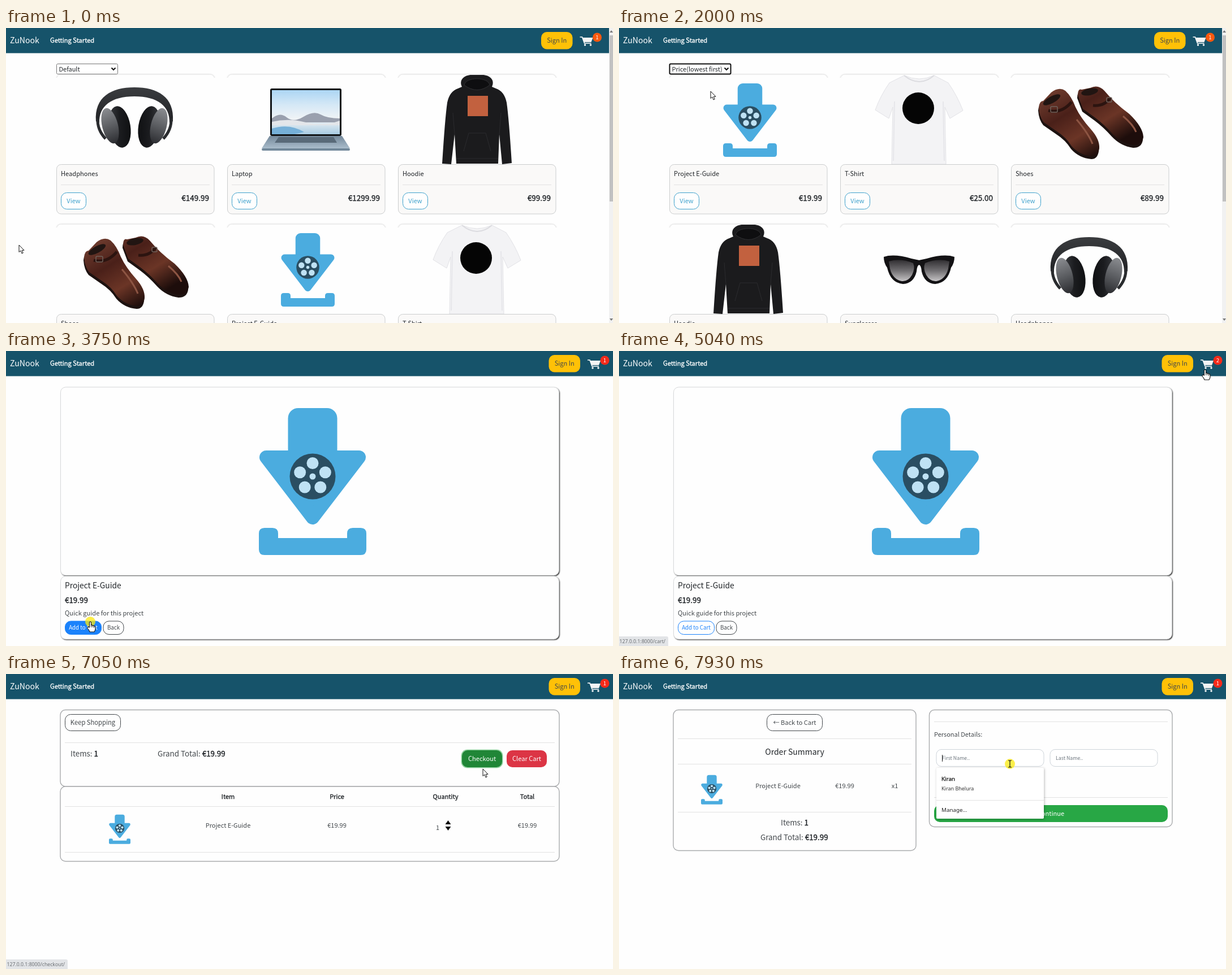
Animation of 1073x522 px, one loop 8000 ms. Source, as an HTML page with a canvas:

```html
<!DOCTYPE html>
<html lang="en">
<head>
<meta charset="utf-8">
<title>Shop walkthrough</title>
<style>
html, body { margin: 0; width: 100%; height: 100%; overflow: hidden; background: #fefefe; }
canvas { display: block; }
</style>
</head>
<body>
<canvas id="stage" width="1073" height="522"></canvas>
<script>
const ctx = document.getElementById('stage').getContext('2d', { alpha: false });
const LOOP = 8000;
const SANS = '"Noto Sans CJK JP", "Noto Sans CJK SC", "Noto Sans CJK", "Noto Sans", sans-serif';
const UI = '"Noto Sans", "Open Sans", sans-serif';
const INK = '#212529', SOFT = '#42474b', BLUE = '#4bacdf', GREEN = '#28a745';

// Pointer path: time, x, y of the tip
const PATH = [
  [0, 23, 384], [120, 23, 384], [860, 188, 71], [990, 188, 71], [1330, 167, 116],
  [1660, 167, 116], [1860, 162, 112], [2000, 162, 112], [2700, 127, 306], [2980, 127, 306],
  [3610, 149, 479], [3960, 149, 479], [4900, 1036, 33], [5110, 1036, 33], [5250, 777, 215],
  [5950, 782, 272], [6400, 782, 272], [6900, 843, 155], [6980, 843, 155], [7050, 843, 168],
  [7250, 843, 168], [7720, 691, 159], [LOOP, 691, 159]
];
const CLICKS = [[790, 990], [1860, 2000], [2840, 2980], [3680, 3890], [6160, 6300], [6940, 7040], [7790, LOOP]];

let time = 0, mouse = { x: 0, y: 0 }, hand = false;

// ---- drawing helpers ----
function text(s, x, y, size = 11, color = INK, align = 'left', font = SANS) {
  ctx.font = `${size}px ${font}`;
  ctx.fillStyle = color;
  ctx.textAlign = align;
  ctx.fillText(s, x, y + size * .365);
  return ctx.measureText(s).width;
}

// Medium weight: regular letters with a hairline outline
function strong(s, x, y, size = 11, color = INK, align = 'left', font = SANS) {
  text(s, x, y, size, color, align, font);
  ctx.strokeStyle = color;
  ctx.lineWidth = .35;
  ctx.strokeText(s, x, y + size * .365);
}

function paint(path, fill, stroke, width = 1) {
  if (fill) { ctx.fillStyle = fill; ctx.fill(path); }
  if (stroke) { ctx.strokeStyle = stroke; ctx.lineWidth = width; ctx.stroke(path); }
}

const shape = (d, fill, stroke, width) => paint(new Path2D(d), fill, stroke, width);

function box(x, y, w, h, r, fill, stroke, width) {
  const p = new Path2D();
  p.roundRect(x, y, w, h, r);
  paint(p, fill, stroke, width);
}

function oval(x, y, rx, ry, fill, turn = 0) {
  const p = new Path2D();
  p.ellipse(x, y, rx, ry, turn, 0, 7);
  paint(p, fill);
}

const dot = (x, y, r, fill) => oval(x, y, r, r, fill);
const rule = (x1, x2, y) => box(x1, y, x2 - x1, 1, 0, '#e2e2e2');

function shade(x1, y1, x2, y2, ...colors) {
  const g = ctx.createLinearGradient(x1, y1, x2, y2);
  colors.forEach((c, i) => g.addColorStop(i / (colors.length - 1), c));
  return g;
}

function shadowed(blur, offset, color, draw) {
  ctx.save();
  ctx.shadowBlur = blur;
  ctx.shadowOffsetX = ctx.shadowOffsetY = offset;
  ctx.shadowColor = color;
  draw();
  ctx.restore();
}

function at(x, y, draw, sx = 1, sy = sx) {
  ctx.save();
  ctx.translate(x, y);
  ctx.scale(sx, sy);
  draw();
  ctx.restore();
}

function mirrored(axis, draw) {
  draw();
  at(2 * axis, 0, draw, -1, 1);
}

function hover(x, y, w, h) {
  const over = mouse.x >= x && mouse.x <= x + w && mouse.y >= y && mouse.y <= y + h;
  hand = hand || over;
  return over;
}

function outlineButton(s, x, y, w, h, color, size = 11, r = 10) {
  const over = hover(x, y, w, h);
  box(x + .5, y + .5, w - 1, h - 1, r, over ? color : '#fefefe', color);
  text(s, x + w / 2, y + h / 2, size, over ? '#fff' : color, 'center');
}

function solidButton(s, x, y, w, h, fill, color = '#fff') {
  box(x, y, w, h, 10, fill);
  text(s, x + w / 2, y + h / 2, 11.1, color, 'center');
}

function pair(label, value, x, y) {
  const w = text(label, x, y, 13.4, SOFT);
  strong(value, x + w + 3, y, 13.4);
}

// ---- product pictures ----
function guide() {
  box(-43.5, -121, 87, 100, [18, 18, 0, 0], BLUE);
  ctx.lineJoin = 'round';
  shape('M-82-34H82L0 73Z', BLUE, BLUE, 24);
  shape('M-85 91H-71Q-61 91-61 101V109H61V101Q61 91 71 91H85Q95 91 95 101V129Q95 139 85 139H-85Q-95 139-95 129V101Q-95 91-85 91Z', BLUE);
  dot(0, 0, 40.5, '#2a4e62');
  dot(0, 0, 5.5, '#bfe2f4');
  for (let i = 0; i < 5; i++) {
    const a = i * Math.PI * .4;
    dot(23.5 * Math.sin(a), -23.5 * Math.cos(a), 10.5, '#bfe2f4');
  }
}

function headphones() {
  shape('M159 165C156 122 186 105 227 105S298 122 295 165L289 168C290 138 268 121 227 121S164 138 165 168Z', shade(0, 105, 0, 165, '#3a3c3f', '#222326'));
  mirrored(227, () => {
    shape('M162 160Q161 180 176 196', null, '#2a2c2f', 5);
    oval(201, 175, 19, 37, shade(182, 0, 220, 0, '#37393d', '#1b1c1f', '#101113'), -.16);
    oval(184, 173, 14, 32, shade(170, 145, 194, 205, '#8a8c90', '#5b5d61', '#2a2b2f'), -.24);
  });
}

function laptop() {
  box(467, 107, 126, 84, 3, '#111417');
  box(470, 110, 120, 78, 0, shade(0, 110, 0, 188, '#acd6f4', '#d5e8f6', '#f1f4f6', '#a8cbe2'));
  shape('M470 160Q484 148 496 158T526 157T556 153T590 160V167H470Z', '#9aa0ae');
  shape('M470 166Q500 159 530 167T590 164V172H470Z', '#e3e6ea');
  shape('M470 178Q500 168 527 184L510 188H470Z', '#76b0d8');
  shape('M466 191H594L608 213H452Z', shade(0, 191, 0, 213, '#74889a', '#a9bccb'));
  shape('M482 193H579L585 203H475Z', '#596a79');
  box(452, 213, 156, 4, 2, '#72889a');
}

function hoodie() {
  shape('M806 104C800 92 810 83 823 83H842C855 83 865 92 859 104L866 107Q881 112 885 132Q889 160 894 239L877 241L872 188L870 240H796L793 188L787 241L771 240Q776 160 780 132Q784 112 799 107Z', '#1b1b1d');
  shape('M810 101C812 86 853 86 855 101Q833 118 810 101Z', '#0e0e10', '#303033');
  shape('M818 186H848L857 218M818 186L809 218M796 231H870M793 188L790 150M872 188L875 150', null, '#2b2b2e');
  box(816, 120, 36, 36, 0, '#c2613f');
}

function shoes() {
  const left = 'M138 406Q139 394 146 394L160 379Q174 368 185 376Q196 386 203 405Q212 424 230 444Q246 462 245 478Q243 492 232 492Q210 490 196 474Q186 458 170 448L147 432Q139 422 138 406Z';
  const right = 'M207 384Q207 371 214 374L229 371Q243 364 254 376Q272 398 298 417Q322 440 323 458Q321 472 306 472Q284 469 268 452Q254 436 238 424L216 408Z';
  for (const d of [right, left]) {
    at(-1, 5, () => shape(d, '#1d1210'));
    shape(d, shade(170, 375, 240, 490, '#6b392c', '#4a2019', '#6b3526', '#1d0d0b'));
  }
  oval(161, 392, 17, 6, '#211512', -.5);
  oval(228, 378, 15, 6, '#211512', -.2);
  shape('M155 411Q178 417 196 396M234 402Q254 404 265 388', null, '#2c1410', 5);
  box(159, 404, 12, 10, 2, null, '#6f625b', 1.5);
  box(258, 388, 9, 8, 2, null, '#6f625b', 1.5);
  shape('M205 427Q226 452 233 470M287 421Q305 436 310 449', null, '#8d5543', 3);
}

function shirt() {
  shape('M806 349Q833 361 859 349L884 362Q900 385 910 411L887 425L878 405L880 506H784L786 405L779 425L755 410Q764 385 780 362Z', '#f3f3f5', '#e2e2e6');
  shape('M806 349Q833 371 859 349', null, '#dcdce0', 2);
  shape('M789 395L787 500M875 395L877 500', null, '#e6e6ea', 2);
  dot(831, 407, 28, '#050505');
}

function sunglasses() {
  mirrored(530.5, () => {
    shape('M468 405Q486 399 517 408L531 411V419Q527 419 526 431Q521 452 502 453Q480 451 474 424Q468 416 468 405Z', '#131214');
    shape('M477 413Q497 407 520 416Q524 425 518 437Q511 449 500 448Q484 445 479 426Z', shade(0, 409, 0, 449, '#2c2a2d', '#6f6d70', '#cac8ca'));
  });
}

const product = (name, price, x, y, draw) => ({ name, price, x, y, draw });
const P = {
  headphones: product('Headphones', '€149.99', 89, 82, headphones),
  laptop: product('Laptop', '€1299.99', 391, 82, laptop),
  hoodie: product('Hoodie', '€99.99', 693, 82, hoodie),
  shoes: product('Shoes', '€89.99', 89, 347, shoes),
  guide: product('Project E-Guide', '€19.99', 0, 0, () => at(142.5, 76.5, guide, .5)),
  shirt: product('T-Shirt', '€25.00', 693, 347, shirt),
  sunglasses: product('Sunglasses', '', 391, 347, sunglasses)
};
const BY_DEFAULT = [P.headphones, P.laptop, P.hoodie, P.shoes, P.guide, P.shirt];
const BY_PRICE = [P.guide, P.shirt, P.shoes, P.hoodie, P.sunglasses, P.headphones];

// ---- page parts ----
function header(width, inset, count, badge) {
  box(0, 0, width, 44.6, 0, '#16536a');
  text('ZuNook', 7, 22, 14.1, '#fff');
  strong('Getting Started', 78, 22, 11.1, '#fff');
  at(-inset, 0, () => {
    solidButton('Sign In', 959.5, 7, 55.5, 30.5, '#ffc107', SOFT);
    shape('M1028 16H1032L1036 27H1048', null, '#fff', 1.6);
    shape('M1033 17H1051L1048 25H1035Z', '#f4f4f4');
    dot(1037, 30, 1.7, '#fff');
    dot(1047, 30, 1.7, '#fff');
    dot(1058.5, 16.5, 8, badge);
    text(count, 1058.5, 16.5, 9.5, '#fff', 'center');
  });
}

function panel(x, y, w, h, lifted) {
  const fill = () => box(x, y, w, h, 9, '#fefefe');
  lifted ? shadowed(2, 1.3, '#222', fill) : fill();
  box(x, y, w, h, 9, null, lifted ? '#d0d2d4' : '#a9abad', lifted ? .8 : 1.4);
}

function card(item, x, y) {
  shadowed(3, 0, '#bbb', () => box(x + .5, y + .5, 279, 159, 8, '#fefefe'));
  box(x - 3, y + 6, 286, 156, 0, '#fefefe');
  at(x - item.x, y - item.y, item.draw);
  box(x + .5, y + 159.5, 278.5, 87.5, 8, '#faf9f8', '#cbcdce');
  text(item.name, x + 8, y + 175.5, 11.1);
  rule(x + 8, x + 271, y + 195);
  outlineButton('View', x + 8, y + 209, 45, 30, '#3ca0cc');
  strong(item.price, x + 270, y + 219, 13.5, INK, 'right');
}

function select() {
  const sorted = time >= 2000;
  box(89.5, 63.5, 108, 18, 2, '#fff', sorted ? '#101010' : '#767676', sorted ? 2 : 1);
  text(sorted ? 'Price(lowest first)' : 'Default', 93.5, 73);
  shape('M186.500 70.500L190 74L193.500 70.500', null, '#111', 2);
  if (time < 990 || sorted) return;
  shadowed(5, 2, '#0006', () => box(89.5, 82.5, 108, 49.500, 0, '#fff', '#888'));
  const picked = Math.max(0, Math.min(2, Math.floor((mouse.y - 82) / 16.3)));
  ['Default', 'Price(lowest first)', 'Products(A-Z)'].forEach((s, i) => {
    if (i === picked) box(90, 82.500 + i * 16, 107, 17, 0, '#1e90ff');
    text(s, 94, 90.5 + i * 16, 11, i === picked ? '#fff' : INK);
  });
}

function status(s, w) {
  box(-1, 505, w + 1, 18, [0, 3, 0, 0], '#e2e4e7');
  text(s, w - 5, 513.5, 8.7, '#6b6f73', 'right', UI);
}

// ---- pages ----
function listPage() {
  header(1066, 13.5, '1', '#f9590f');
  (time < 2000 ? BY_DEFAULT : BY_PRICE).forEach((item, i) =>
    card(item, 89 + i % 3 * 302, 82 + Math.floor(i / 3) * 265));
  select();
  box(1066, 0, 7, 522, 0, '#f1f1f1');
  box(1067, 13, 6, 294, 0, '#c1c1c1');
  shape('M1067 8L1070 4L1073 8Z', '#777');
  shape('M1067 514L1070 518L1073 514Z', '#777');
}

function detailPage() {
  header(1073, 0, time < 3960 ? '1' : '2', '#f42a1a');
  panel(96.5, 64, 881, 333, true);
  panel(96.5, 398.5, 881, 111.500, true);
  at(542, 222, guide);
  text('Project E-Guide', 104, 415, 13.8);
  strong('€19.99', 104, 441, 13.4);
  text('Quick guide for this project', 104, 464, 11.1, SOFT);
  outlineButton('Add to Cart', 104, 477.500, 65, 24.500, '#1b82fb', 9.7);
  outlineButton('Back', 171.500, 477.500, 37, 24.500, SOFT, 9.7);
  if (hover(1026, 12, 28, 25)) status('127.0.0.1:8000/cart/', 87);
}

function cartPage() {
  const count = time < 6300 ? '2' : '1';
  const total = time < 6300 ? '€39.98' : '€19.99';
  const focused = time >= 6980;
  header(1073, 0, count, '#f42a1a');
  panel(96, 63.5, 882, 135.5);
  panel(96, 199, 882, 132.500);
  outlineButton('Keep Shopping', 104, 71, 99, 30, SOFT, 11.2);
  rule(104, 970, 121);
  pair('Items:', count, 114, 141);
  pair('Grand Total:', total, 268, 141);
  if (focused) box(804.500, 133.500, 74, 33, 11, '#94d3a2');
  const over = hover(806, 135, 71, 30);
  solidButton('Checkout', 806, 135, 71, 30, over || focused ? '#208637' : GREEN);
  solidButton('Clear Cart', 885, 135, 71, 30, '#dc3545');
  const columns = [['Item', 'Project E-Guide', 392.5], ['Price', '€19.99', 585], ['Quantity', '', 777], ['Total', total, 921.5]];
  for (const [title, value, x] of columns) {
    strong(title, x, 217, 11, INK, 'center');
    text(value, x, 268, 11, SOFT, 'center');
  }
  rule(104, 970, 234);
  rule(104, 970, 315);
  at(201, 273, guide, .2);
  text(count, 763, 272, 11, SOFT, 'center');
  shape('M776.500 266L781.500 259L786.500 266ZM776.500 270L781.500 277L786.500 270Z', '#111');
  hover(776, 258, 11, 20);
  if (time < 5320) status('127.0.0.1:8000/cart/', 87);
  if (focused) status('127.0.0.1:8000/checkout/', 109);
}

function checkoutPage() {
  header(1073, 0, '1', '#f42a1a');
  panel(96, 63.5, 429, 249);
  outlineButton('← Back to Cart', 261, 71, 99, 30, SOFT);
  [114, 159, 244].forEach(y => rule(104, 517, y));
  text('Order Summary', 310.5, 138, 14, INK, 'center');
  at(164, 203, guide, .2);
  text('Project E-Guide', 281, 198, 11, SOFT, 'center');
  text('€19.99', 399, 198, 11, SOFT, 'center');
  text('x1', 487.5, 198, 11, SOFT, 'center');
  pair('Items:', '1', 286, 263);
  pair('Grand Total:', '€19.99', 250, 289);

  panel(548.5, 63.5, 429.500, 207);
  rule(557, 970, 84);
  text('Personal Details:', 557, 107, 11, SOFT);
  box(561, 133.5, 190, 30, 9, '#fff', '#ced4da');
  box(762, 133.5, 190, 30, 9, '#fff', '#ced4da');
  text('First Name..', 571, 149, 8.8, '#6c757d');
  text('Last Name..', 772, 149, 8.8, '#6c757d');
  rule(557, 970, 218);
  solidButton('Continue', 557, 232, 413, 30, GREEN);
  if (time < 7860) return;
  box(571, 143, 1, 12, 0, '#222');
  shadowed(4, 1, '#0004', () => box(561, 166, 190, 90, 2, '#fff'));
  strong('Kiran', 570, 185.5, 9.8, '#222', 'left', UI);
  text('Kiran Bhelura', 570, 202.5, 9, '#333', 'left', UI);
  rule(561, 751, 223);
  text('Manage...', 570, 240.5, 9.8, '#222', 'left', UI);
}

// ---- pointer ----
function track() {
  const i = PATH.findIndex(k => k[0] > time);
  const [t0, x0, y0] = PATH[i - 1], [t1, x1, y1] = PATH[i];
  const p = (time - t0) / (t1 - t0), e = p * p * (3 - 2 * p);
  mouse = { x: x0 + (x1 - x0) * e, y: y0 + (y1 - y0) * e };
}

function pointer() {
  if (CLICKS.some(([a, b]) => time >= a && time < b)) dot(mouse.x, mouse.y, 9, '#fdea10c0');
  at(mouse.x, mouse.y, () => {
    if (time >= 7650) {
      shape('M-3-6H-1L0-5L1-6H3M0-5V5M-3 6H-1L0 5L1 6H3', null, '#111', 1.2);
    } else if (hand) {
      shape('M-1.500 10V1Q0-1 1.500 1V6Q3 5 4 7Q6 6 6.500 8Q9 7 9 10V13Q9 15 7 18H-1Q-2 15-5 11.500Q-5 8-1.500 10Z', '#fff', '#111', 1.1);
      shape('M1.500 6V10M4 7V10M6.500 8V11', null, '#111', .8);
    } else {
      shape('M0 0V12.500L3 10L5 15L7.200 14L5.200 9.300H9Z', '#fff', '#111', 1);
    }
  });
}

function frame(now) {
  time = now % LOOP;
  hand = false;
  track();
  box(0, 0, 1073, 522, 0, '#fefefe');
  const page = time < 2980 ? listPage : time < 5110 ? detailPage : time < 7190 ? cartPage : checkoutPage;
  page();
  pointer();
  requestAnimationFrame(frame);
}
requestAnimationFrame(frame);
</script>
</body>
</html>
```
